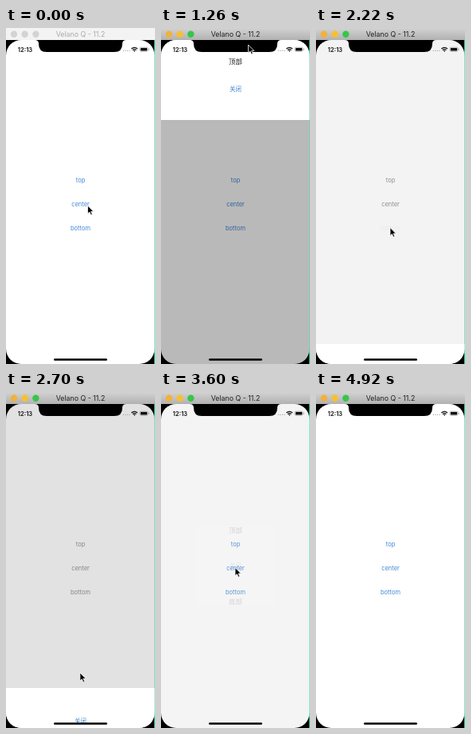
Recreate the animation shown at these times as an HTML page. Size 187 px wide and 420 px high, loop 5.04 s.

```html
<!DOCTYPE html>
<html lang="zh">
<head>
<meta charset="utf-8">
<title>Sheet presentation</title>
<style>
html, body { margin: 0; width: 100%; height: 100%; overflow: hidden; background: #000; }
svg { display: block; position: fixed; left: 0; top: 0; width: 187px; height: 420px; }
text { text-anchor: middle; font-family: Inter, Roboto, sans-serif; }
.link { font-size: 7.5px; }
.cjk { font-family: "Noto Sans CJK SC", "Noto Sans CJK", sans-serif; font-size: 8.5px; fill: #222; }
.cjk.close { font-size: 7.5px; fill: #3d86d2; }
</style>
</head>
<body>
<svg viewBox="0 0 187 420">
  <defs>
    <linearGradient id="bar" x2="0" y2="1">
      <stop offset="0" stop-color="#d2d2d2"/><stop offset="1" stop-color="#b1b1b1"/>
    </linearGradient>
    <clipPath id="screen"><rect y="15" width="186.4" height="405" rx="19"/></clipPath>
  </defs>
  <rect width="187" height="420"/>
  <rect x="186" y="15" width="1" height="405" fill="#35d9a0"/>

  <g clip-path="url(#screen)">
    <rect y="15" width="187" height="405" fill="#fff"/>
    <g id="links">
      <text class="link" x="93.5" y="192.6">top</text>
      <text class="link" x="93.5" y="222.6">center</text>
      <text class="link" x="93.5" y="252.6">bottom</text>
    </g>
    <rect id="dim" y="15" width="187" height="405"/>
    <g id="top">
      <rect y="15" width="187" height="100" fill="#fff"/>
      <text class="cjk" x="93.5" y="45.2">顶部</text>
      <text class="cjk close" x="93.5" y="79">关闭</text>
    </g>
    <g id="bottom">
      <rect y="320" width="187" height="100" fill="#fff"/>
      <text class="cjk close" x="93.5" y="364">关闭</text>
      <text class="cjk" x="93.5" y="401">底部</text>
    </g>
    <g id="center">
      <rect x="43.5" y="167.5" width="100" height="100" fill="#fff"/>
      <text class="cjk" x="93.5" y="176.2">顶部</text>
      <text class="cjk close" x="93.5" y="220.4">关闭</text>
      <text class="cjk" x="93.5" y="265.2">底部</text>
    </g>
  </g>

  <path d="M36 15Q41 15 41 19.5V20Q41 30 51 30H136Q146 30 146 20V19.5Q146 15 151 15Z"/>
  <text x="24" y="29.5" font-size="7.6" font-weight="600" fill="#111">12:13</text>
  <g fill="#aaa">
    <circle cx="147.5" cy="28.4" r=".7"/><circle cx="150" cy="28.4" r=".7"/>
    <circle cx="152.5" cy="28.4" r=".7"/><circle cx="155" cy="28.4" r=".7"/>
  </g>
  <g fill="none" stroke="#111" stroke-width="1.2">
    <path d="M157.4 26Q161.2 22.6 165 26M158.9 27.6Q161.2 25.6 163.5 27.6"/>
    <path d="M160.3 28.5H162.1L161.2 29.4Z" stroke-width=".8"/>
    <rect x="168" y="24.2" width="10" height="5" rx="1.4" stroke="#888" stroke-width=".6"/>
  </g>
  <rect x="168.9" y="25" width="8.2" height="3.4" rx=".7" fill="#111"/>
  <rect x="178.7" y="25.8" width=".8" height="1.8" fill="#888"/>
  <rect x="60" y="413.3" width="67" height="2.5" rx="1.25"/>

  <rect id="title" width="187" height="15"/>
  <g id="lights">
    <circle cx="10" cy="7.8" r="4.2"/><circle cx="23.6" cy="7.8" r="4.2"/><circle cx="37.4" cy="7.8" r="4.2"/>
  </g>
  <text id="name" x="93.5" y="11.2" font-size="8.8">Velano Q - 11.2</text>

  <g id="cursor">
    <circle id="ring" r="15" cy="1.5" fill="none" stroke="#222" stroke-width="1.3"/>
    <path id="arrow" d="M0 0V10.2L2.4 8 4 11.8 5.8 11 4.2 7.4H7.4Z" stroke-width=".8" stroke-linejoin="round"/>
  </g>
</svg>
<script>
const LOOP = 5040, TICK = 60, SHADE = 0.275;
const $ = id => document.getElementById(id);
const set = (el, attrs) => { for (const k in attrs) el.setAttribute(k, attrs[k]); };

// start, end and step count of each stretch of movement
const bursts = [
  [120, 600, 6], [720, 1200, 6], [1260, 1740, 6], [1860, 2340, 6], [2400, 2880, 6],
  [3000, 3480, 6], [3600, 4080, 6], [4260, 4320, 2], [4560, 4920, 5]
];
const stops = [0];
for (const [a, b, n] of bursts)
  for (let i = 0; i < n; i++)
    stops.push(Math.round((a + (b - a) * i / (n - 1)) / TICK) * TICK);
const snap = t => stops.reduce((last, s) => s <= t ? s : last, 0);

// how far each sheet is presented
const open = {
  top: [[360, 0], [480, .5], [600, .96], [720, 1], [1380, 1], [1440, .88], [1560, .37], [1620, .1], [1740, 0]],
  bottom: [[2160, 0], [2220, .25], [2340, .85], [2400, 1], [2580, 1], [2700, .5], [2880, 0]],
  center: [[3540, 0], [3600, .15], [3720, .7], [3840, 1], [4500, 1], [4560, .85], [4740, .3], [4920, 0]]
};
const path = [
  [0, 102.5, 222], [120, 102.5, 222], [360, 92.5, 193.5], [720, 92.5, 193.5], [1200, 109.5, 21],
  [1740, 109.5, 21], [2040, 93, 249.5], [2340, 93, 249.5], [2520, 93, 356], [2640, 93, 356],
  [2880, 92.5, 335.5], [2940, 92.5, 335.5], [3420, 93, 219.5], [3600, 93, 219.5],
  [4020, 97.5, 293], [4200, 97.5, 293], [4320, 92.5, 219.5], [4680, 92.5, 219.5], [4920, 195, 432]
];
const presses = [[360, 480], [3480, 3600], [2160, 2280]];

function at(keys, t, col = 1) {
  const i = keys.findIndex(k => k[0] > t);
  if (i === 0) return keys[0][col];
  if (i < 0) return keys[keys.length - 1][col];
  const a = keys[i - 1], b = keys[i];
  return a[col] + (b[col] - a[col]) * (t - a[0]) / (b[0] - a[0]);
}

function draw(t) {
  const within = (a, b) => t >= a && t < b;
  const top = at(open.top, t), bottom = at(open.bottom, t), center = at(open.center, t);

  set($("top"), { transform: `translate(0 ${(top - 1) * 100})` });
  set($("bottom"), { transform: `translate(0 ${(1 - bottom) * 100})` });
  set($("center"), { opacity: center });
  set($("dim"), { "fill-opacity": SHADE * Math.max(top, bottom ** 1.27, center) });

  [...$("links").children].forEach((link, i) => set(link, {
    opacity: within(...presses[i]) ? .08 : 1,
    fill: bottom > 0 ? "#969696" : "#4289d8"
  }));

  const active = t >= 120;
  const colors = active ? ["#f2b13a", "#f8bf30", "#35c649"] : ["#d3d3d3", "#d3d3d3", "#d3d3d3"];
  set($("title"), { fill: active ? "url(#bar)" : "#f3f3f3" });
  set($("name"), { fill: active ? "#222" : "#aaa" });
  [...$("lights").children].forEach((c, i) => set(c, { fill: colors[i] }));

  const pressed = within(1380, 1620);
  set($("cursor"), { transform: `translate(${at(path, t)} ${at(path, t, 2)})` });
  set($("ring"), { opacity: pressed ? 1 : 0 });
  set($("arrow"), { fill: pressed ? "#eee" : "#000", stroke: pressed ? "#222" : "#fff" });
}

const begin = performance.now();
function frame() {
  draw(snap((performance.now() - begin) % LOOP));
  requestAnimationFrame(frame);
}
frame();
</script>
</body>
</html>
```
